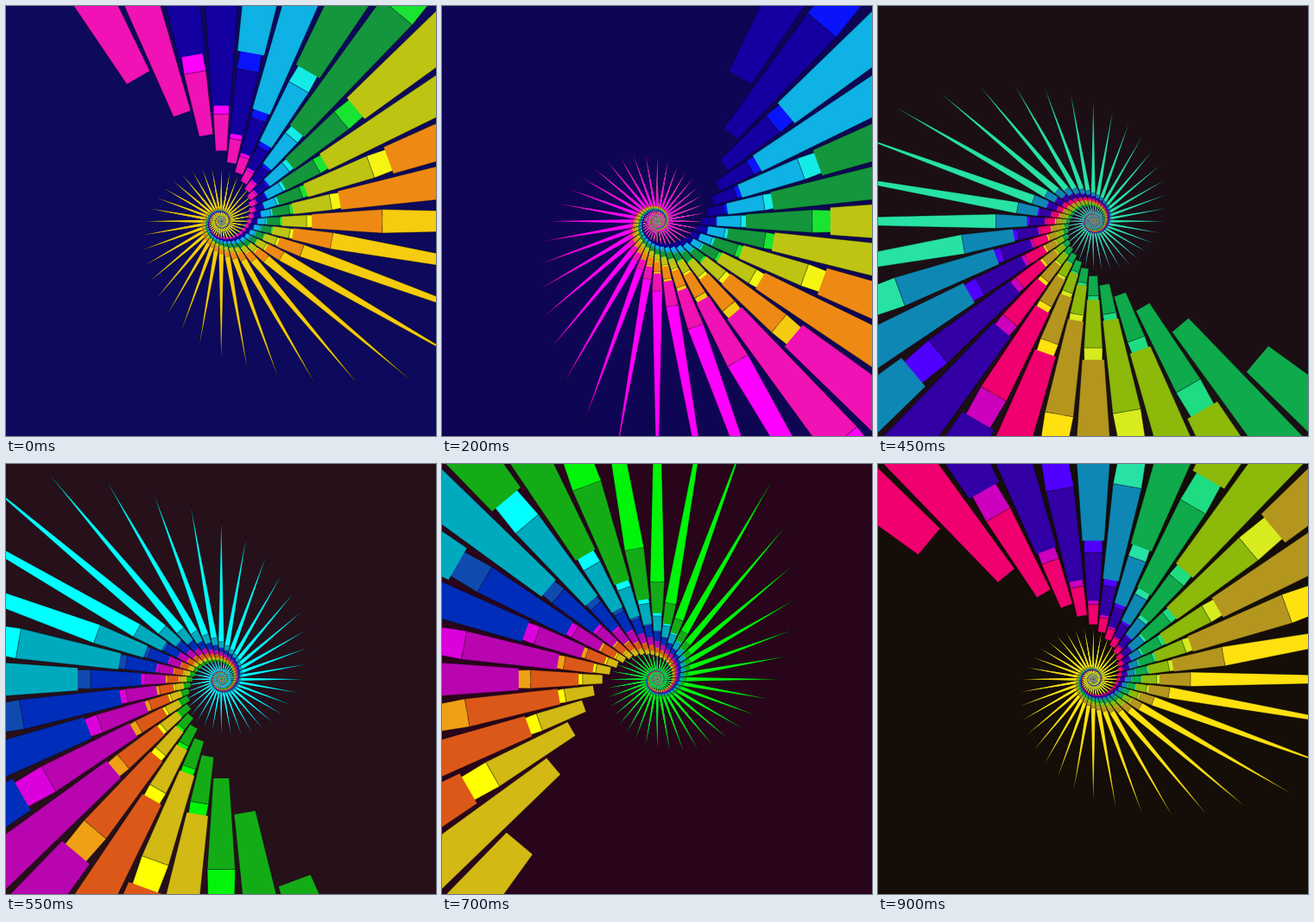
An HTML page with a canvas for the animation above (950 ms loop, 498 by 498 pixels).

```html
<!DOCTYPE html>
<html lang="en">
<head>
<meta charset="utf-8">
<title>Spiral of spikes</title>
<style>
  html, body { margin: 0; width: 100%; height: 100%; overflow: hidden; background: #000; }
  canvas { display: block; }
</style>
</head>
<body>
<canvas id="stage" width="498" height="498"></canvas>
<script>
const ctx = document.getElementById('stage').getContext('2d');

const STEP = 50, STEPS = 19;
const BAR_RADIUS = 427;   // screen radius of a bar at depth 1
const TIP_RADIUS = 1800;  // screen radius of a spike tip at depth 1
const BAR_LENGTH = 1.78;  // depth covered by one bar
const BAR_PITCH = 2.03;   // depth from one bar to the next on a blade
const BARS = 6, MAX_DEPTH = 420;

// Colour cycle: three shades for each of the six hues.
const BAR = [
  0xf012b4, 0xb805b0, 0x3200a5,  0x1400a0, 0x002db9, 0x0f87b4,
  0x0eb2e4, 0x00aabe, 0x0faa4b,  0x14963c, 0x14ac16, 0x8cb90a,
  0xbec412, 0xd2b914, 0xb4961e,  0xee8a14, 0xdc5819, 0xf0006e
];
const SPIKE = [
  0xff00ff, 0xdc00dc, 0x5000ff,  0x0a14fa, 0x0f4baf, 0x28e1a5,
  0x14ebe6, 0x00ffff, 0x1edc82,  0x19e432, 0x00f50a, 0xd7eb1e,
  0xf5f514, 0xffff00, 0xffe10f,  0xf5cc0f, 0xf0a014, 0xcd00be
];
const BACKDROP = [
  [0, 0x0d095c], [4, 0x0e0654], [7, 0x0f0d10], [11, 0x26101a],
  [14, 0x28051a], [16, 0x441023], [18, 0x140d08]
];

function mix(a, b, t) {
  const channel = s => Math.round((a >> s & 255) * (1 - t) + (b >> s & 255) * t);
  return `rgb(${channel(16)},${channel(8)},${channel(0)})`;
}

function shade(list, quarter) {
  const hue = Math.floor(quarter / 4) % 6 * 3, phase = quarter % 4;
  const first = hue + [0, 1, 1, 2][phase];
  return mix(list[first], list[hue + 2], phase === 2 ? 0.5 : 0);
}

function backdrop(step) {
  const i = Math.max(1, BACKDROP.findIndex(([s]) => s >= step));
  const [s0, c0] = BACKDROP[i - 1], [s1, c1] = BACKDROP[i];
  return mix(c0, c1, (step - s0) / (s1 - s0));
}

// Edged trapezoid along the x axis, from radius r0 to r1 with the given half widths.
function taper(r0, h0, r1, h1, fill) {
  ctx.fillStyle = fill;
  ctx.lineWidth = Math.min(1, r0 * 0.015);
  ctx.beginPath();
  ctx.moveTo(r0, -h0);
  ctx.lineTo(r1, -h1);
  ctx.lineTo(r1, h1);
  ctx.lineTo(r0, h0);
  ctx.fill();
  ctx.stroke();
}

function drawBlade(depth, barFills, spikeFills) {
  for (let j = 0; j < BARS; j++) {
    const start = depth - j * BAR_PITCH, end = start - BAR_LENGTH;
    if (start < 0.3) return;
    const r0 = BAR_RADIUS / start, r1 = BAR_RADIUS / Math.max(end, 0.05);
    if (end > 0.05) taper(r1, r1 * 0.0735, TIP_RADIUS / end, 0, spikeFills[j]);
    taper(r0, r0 * 0.08, r1, r1 * 0.0735, barFills[j]);
  }
}

function draw(step) {
  // The turn is 15 degrees per pose; from the sixth step on, every fourth pose is skipped.
  const pose = step + Math.max(0, Math.floor(step / 3) - 1);
  const fills = list => Array.from({ length: BARS }, (_, j) => shade(list, 4 * j + pose));
  const barFills = fills(BAR), spikeFills = fills(SPIKE);
  const offset = 14.22 - 1.5 * pose;

  ctx.setTransform(1, 0, 0, 1, 0, 0);
  ctx.fillStyle = backdrop(step);
  ctx.fillRect(0, 0, 498, 498);
  ctx.strokeStyle = 'rgba(0, 0, 0, 0.4)';
  ctx.lineJoin = 'bevel';
  for (let blade = Math.floor(MAX_DEPTH - offset); blade + offset > 0.3; blade--) {
    const angle = blade * Math.PI / 18, c = Math.cos(angle), s = Math.sin(angle);
    ctx.setTransform(c, s, -s, c, 249.3, 249.3);
    drawBlade(blade + offset, barFills, spikeFills);
  }
}

let shown = -1;
function tick() {
  const step = Math.floor(performance.now() / STEP) % STEPS;
  if (step !== shown) draw(shown = step);
  requestAnimationFrame(tick);
}
tick();
</script>
</body>
</html>
```
